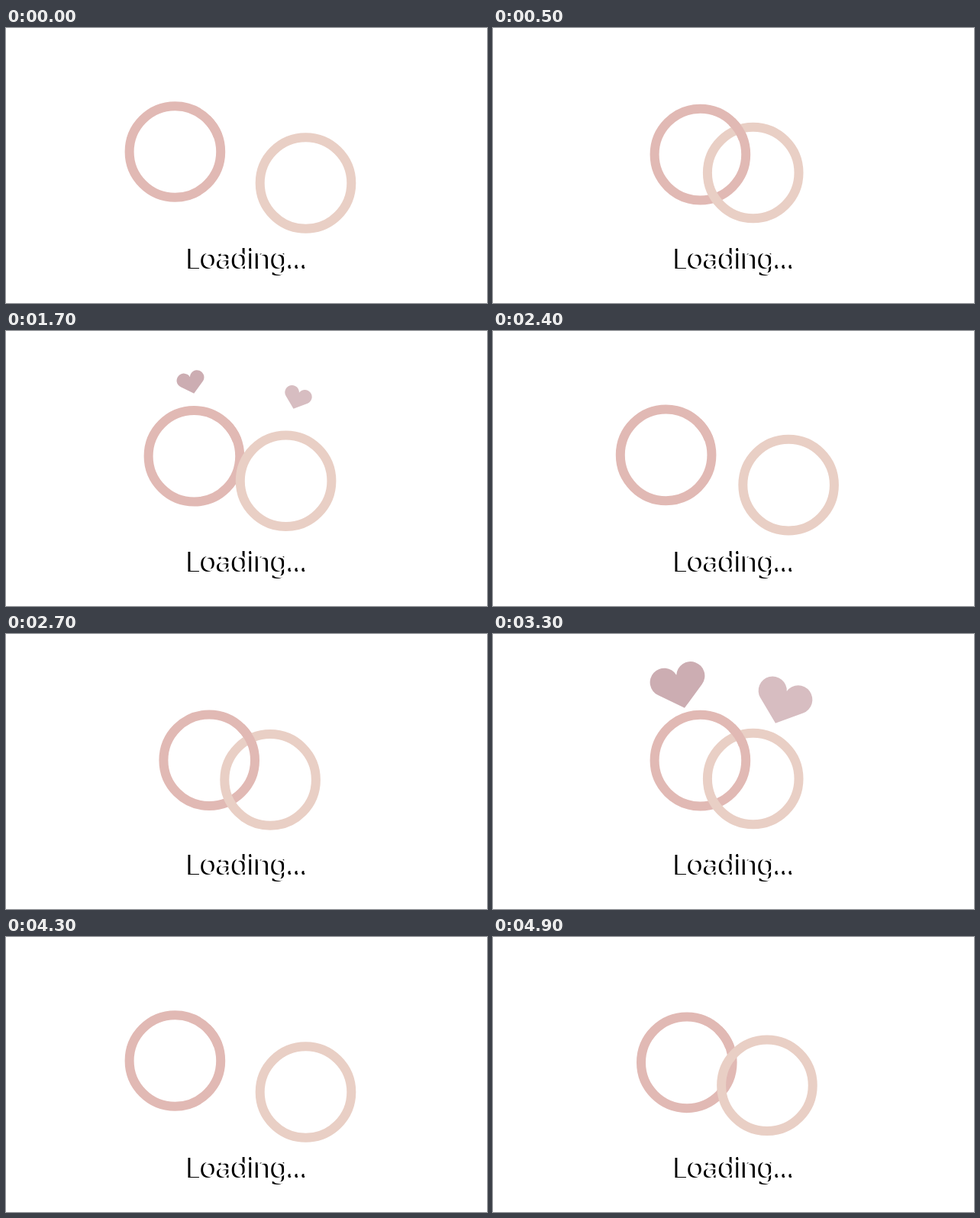
Recreate the animation shown at these times as an HTML page. Size 630x360 px, loop 5000 ms.

```html
<!DOCTYPE html>
<html lang="en">
<head>
<meta charset="utf-8">
<title>Loading</title>
<style>
  html, body { margin: 0; width: 100%; height: 100%; overflow: hidden; background: #fff; }
  svg { position: absolute; left: 0; top: 0; }
  .ring { fill: none; stroke-width: 12; }
  .rose { stroke: #e1b9b4; }
  .sand { stroke: #e9cfc5; }
  /* White letters: only the offset shadow shows, so the hairlines vanish */
  p {
    position: absolute; left: 238px; top: 279px; margin: 0;
    font: 36px/44px "Noto Sans", sans-serif; letter-spacing: -.7px; white-space: nowrap;
    color: #fff; text-shadow: -3px .6px #000;
  }
</style>
</head>
<body>
<svg width="630" height="360" viewBox="0 0 630 360">
  <defs>
    <path id="heart" d="M0 39L-29.7 14.3A18.6 18.6 0 1 1 0 -5.4A18.6 18.6 0 1 1 29.7 14.3Z"/>
  </defs>
  <circle id="ringA" class="ring rose" r="59.8"/>
  <circle id="ringB" class="ring sand" r="59.8"/>
  <!-- Part of the first ring that passes over the second -->
  <path id="link" class="ring rose" d="M41.5 -43A59.8 59.8 0 0 1 56.2 -20.5"/>
  <g id="heartA" fill="#ccadb2"><use href="#heart" transform="translate(0 -7.5) rotate(-14)"/></g>
  <g id="heartB" fill="#d7bdc1"><use href="#heart" transform="translate(0 -6.5) rotate(19.5)"/></g>
</svg>
<p>Loading...</p>
<script>
  const LOOP = 5000, CYCLE = 2300, STEP = 100, MOVE = 500, LEAVE = 1450;
  const get = id => document.getElementById(id);
  const pathA = { from: [221.4, 162], to: [271.4, 165.6] };
  const pathB = { from: [392.5, 203], to: [340.7, 189.5] };
  const rings = [
    { el: get('ringA'), ...pathA },
    { el: get('ringB'), ...pathB },
    { el: get('link'), ...pathA }
  ];
  const hearts = [
    { el: get('heartA'), at: [241.5, 66.5] },
    { el: get('heartB'), at: [383, 86.5] }
  ];

  const ease = x => {
    x = Math.min(1, Math.max(0, x));
    return x * x * (3 - 2 * x);
  };
  const mix = (a, b, k) => a + (b - a) * k;

  function draw(now) {
    const t = Math.floor((now % LOOP) / STEP) * STEP % CYCLE;
    const leave = ease((t - LEAVE) / MOVE);
    const join = ease(t / MOVE) - leave;
    const grow = ease((t - MOVE) / MOVE) - leave;

    for (const { el, from, to } of rings)
      el.setAttribute('transform', `translate(${from.map((v, i) => mix(v, to[i], join))})`);
    for (const { el, at } of hearts) {
      el.setAttribute('transform', `translate(${at}) scale(${grow})`);
      el.style.display = grow > 0 ? '' : 'none';
    }
  }

  const start = performance.now();
  function frame() {
    draw(performance.now() - start);
    requestAnimationFrame(frame);
  }
  frame();
</script>
</body>
</html>
```
